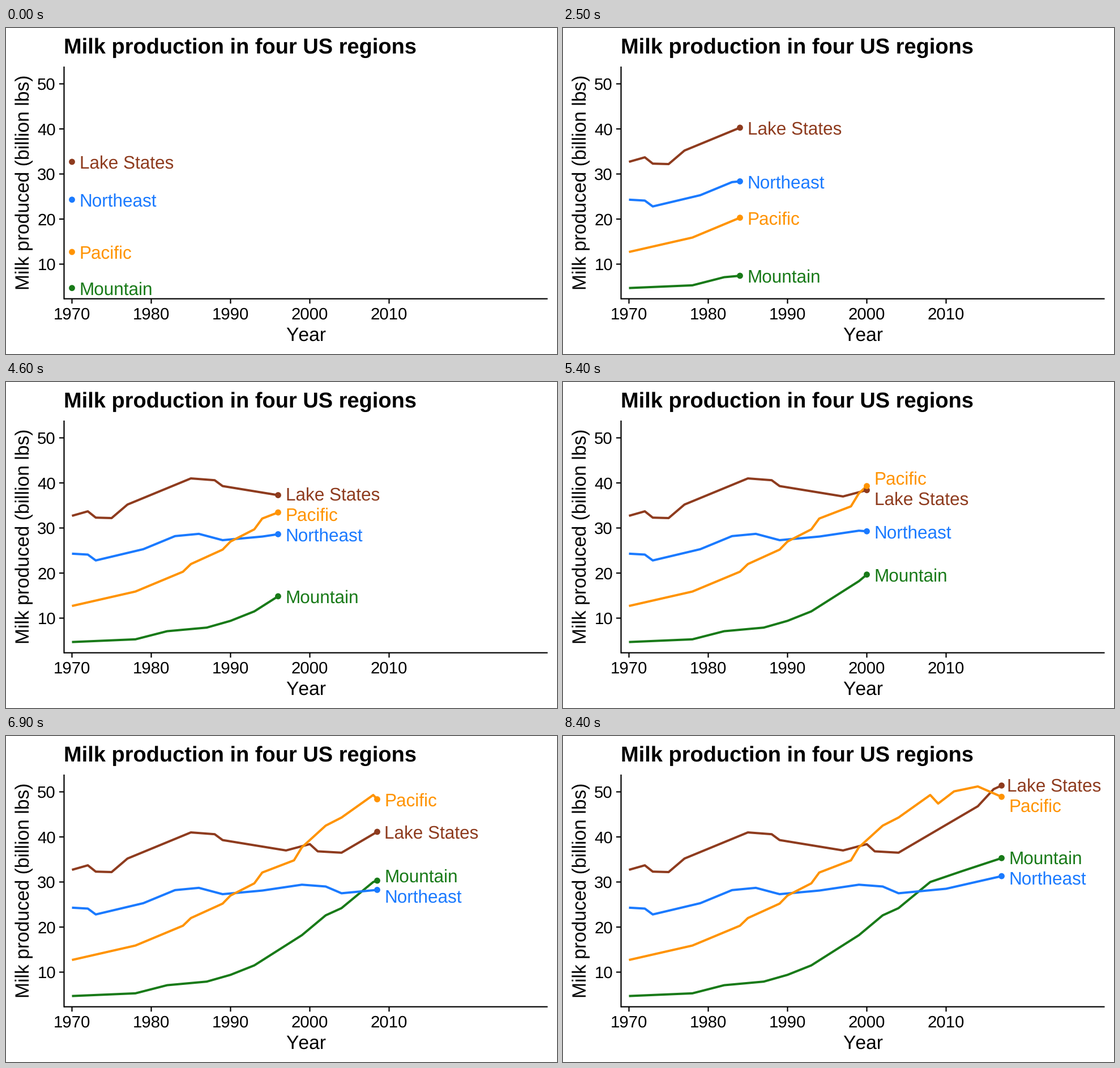
A matplotlib script for the animation above (10 s loop, 973 by 575 pixels).

```python
import numpy as np
import matplotlib.pyplot as plt
from matplotlib.animation import FuncAnimation
from matplotlib.patches import Circle

WIDTH, HEIGHT, DPI = 973, 575, 64
PX = 72 / DPI  # points per pixel
FRAMES, LAST_STEP = 100, 84
FIRST_YEAR, SPAN = 1970, 47
YEARS = np.arange(SPAN + 1)

PANEL_LEFT, PANEL_TOP, PANEL_RIGHT, PANEL_BOTTOM = 102.5, 68, 956.5, 477.6
LABEL_GAP, LABEL_SIZE, LABEL_HEIGHT = 13, 31.5, 36
LABEL_RIGHT = 949

# A high kerning factor switches pair kerning off
plt.rcParams.update({"font.family": "Liberation Sans", "text.hinting": "none",
                     "text.kerning_factor": 6})


def x_px(years):
    return 116.5 + 14 * years


def y_px(value):
    return 496 - 7.95 * value


fig = plt.figure(figsize=(WIDTH / DPI, HEIGHT / DPI), dpi=DPI, facecolor="white")
ax = fig.add_axes((0, 0, 1, 1))
ax.set(xlim=(0, WIDTH), ylim=(HEIGHT, 0))
ax.axis("off")


def write(x, y, text, size, **style):
    return ax.text(x, y, text, fontsize=size * PX, va="baseline", **style)


def rule(x, y):
    ax.plot(x, y, color="black", lw=2.2 * PX, solid_capstyle="butt",
            snap=False, zorder=1)


def draw_axes():
    rule([PANEL_LEFT] * 2, [PANEL_TOP, PANEL_BOTTOM + 1])
    rule([PANEL_LEFT, PANEL_RIGHT], [PANEL_BOTTOM] * 2)
    for value in range(10, 60, 10):
        y = y_px(value)
        rule([PANEL_LEFT - 8.5, PANEL_LEFT], [y, y])
        write(88, y + 10.5, str(value), 29.4, ha="right")
    for years in range(0, 50, 10):
        x = x_px(years)
        rule([x, x], [PANEL_BOTTOM, PANEL_BOTTOM + 8.5])
        write(x, 514, str(FIRST_YEAR + years), 29.4, ha="center")
    write(102, 45, "Milk production in four US regions", 37.95, weight="bold")
    write(529.5, 552, "Year", 33.6, ha="center")
    write(41, 272.5, "Milk produced (billion lbs)", 33.6, ha="center",
          rotation=90, rotation_mode="anchor")


class Region:
    """One line, dot and label; turns maps years since 1970 to billion lbs."""

    def __init__(self, name, color, turns):
        self.values = np.interp(YEARS, list(turns), list(turns.values()))
        self.line, = ax.plot([], [], color=color, lw=4 * PX, zorder=2,
                             solid_capstyle="butt", solid_joinstyle="round")
        self.dot = ax.add_patch(Circle((0, 0), 5.4, color=color, lw=0, zorder=3))
        self.label = write(0, 0, name, LABEL_SIZE, color=color, zorder=4)
        box = self.label.get_window_extent(fig.canvas.get_renderer())
        self.text_width = box.width - 1

    def reveal(self, elapsed):
        known = YEARS[:int(elapsed) + 1]
        x, y = x_px(elapsed), y_px(np.interp(elapsed, YEARS, self.values))
        self.line.set_data(np.append(x_px(known), x),
                           np.append(y_px(self.values[known]), y))
        self.dot.center = x, y
        return y

    def place_label(self, elapsed, y):
        x = min(x_px(elapsed) + LABEL_GAP, LABEL_RIGHT - self.text_width)
        self.label.set_position((x, y + 12))


draw_axes()
regions = [
    Region("Lake States", "#8e3b1e", {
        0: 32.7, 2: 33.7, 3: 32.3, 5: 32.2, 7: 35.2, 15: 41, 18: 40.6, 19: 39.3,
        27: 37, 30: 38.4, 31: 36.8, 34: 36.5, 44: 46.8, 46: 50.6, 47: 51.4}),
    Region("Mountain", "#187a18", {
        0: 4.7, 8: 5.3, 12: 7.1, 17: 7.9, 20: 9.4, 23: 11.5, 29: 18.2,
        32: 22.6, 34: 24.2, 38: 30, 42: 32.4, 47: 35.3}),
    Region("Northeast", "#1a7aff", {
        0: 24.3, 2: 24.1, 3: 22.8, 9: 25.3, 13: 28.2, 16: 28.7, 19: 27.3,
        24: 28.1, 29: 29.4, 32: 29, 34: 27.5, 40: 28.5, 47: 31.3}),
    Region("Pacific", "#ff9300", {
        0: 12.7, 8: 15.9, 14: 20.3, 15: 22, 19: 25.2, 20: 27, 23: 29.7, 24: 32.1,
        28: 34.8, 29: 37.7, 32: 42.5, 34: 44.3, 38: 49.3, 39: 47.4, 41: 50.1,
        44: 51.2, 47: 48.9}),
]

# Each year falls on a whole step, so the pace alternates slightly
year_steps = np.round(YEARS * LAST_STEP / SPAN)


def spread(centers):
    """Push sorted label centres apart and keep them inside the panel."""
    y = np.array(centers)
    half = LABEL_HEIGHT / 2
    for _ in range(60):
        for i in range(len(y) - 1):
            overlap = max(0, LABEL_HEIGHT - (y[i + 1] - y[i]))
            y[i] -= overlap / 2
            y[i + 1] += overlap / 2
        y = np.clip(y, PANEL_TOP + half, PANEL_BOTTOM - half)
    return y


def update(frame):
    elapsed = np.interp(frame, year_steps, YEARS)
    heights = [region.reveal(elapsed) for region in regions]
    order = np.argsort(heights, kind="stable")
    for i, y in zip(order, spread(np.take(heights, order))):
        regions[i].place_label(elapsed, y)
    return []


animation = FuncAnimation(fig, update, frames=FRAMES, interval=100,
                          init_func=lambda: update(0), repeat=True,
                          repeat_delay=0)
plt.show()
```
